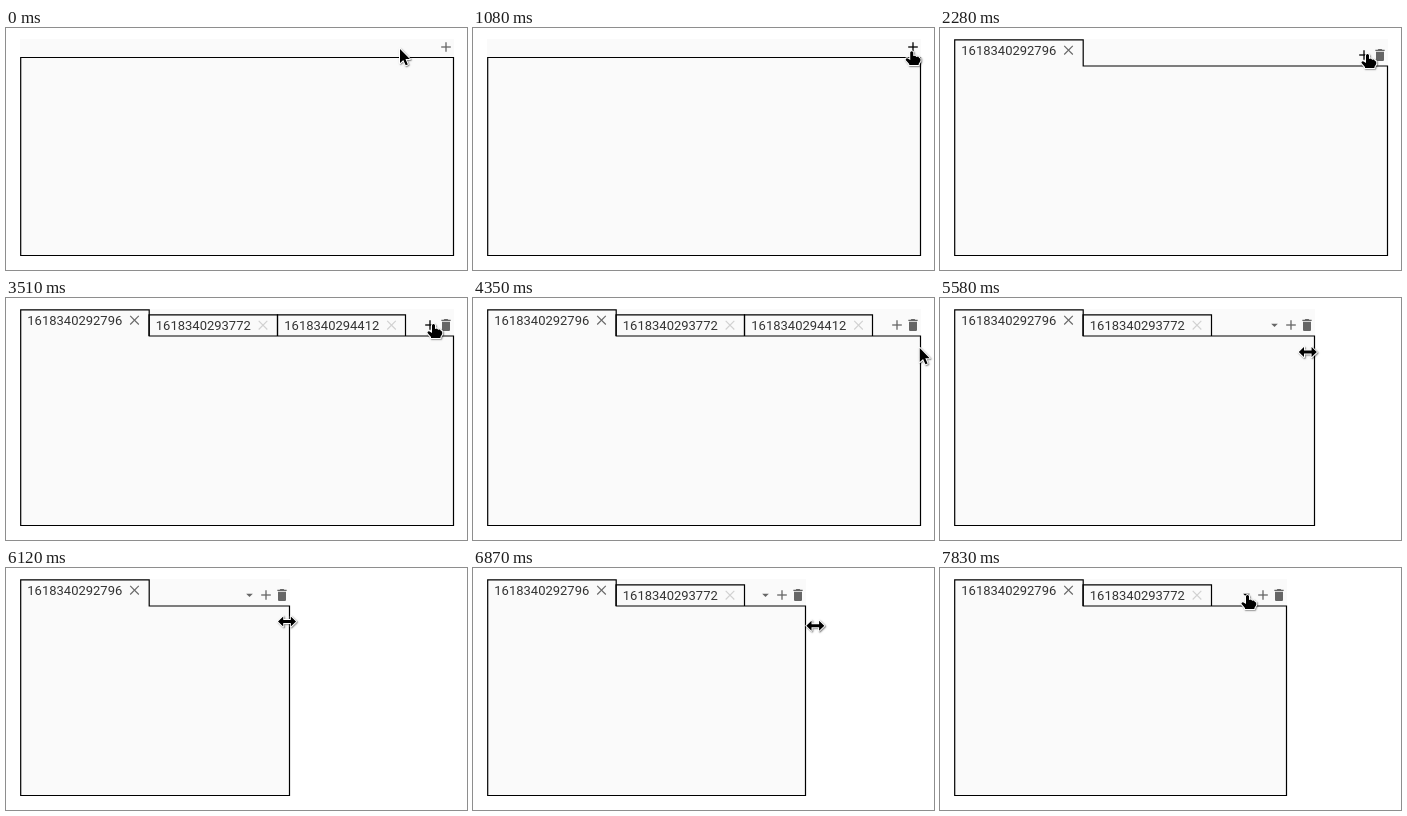
Recreate the animation shown at these times as an HTML page with a canvas. Size 461 px wide and 242 px high, loop 8 s.

```html
<!DOCTYPE html>
<html lang="en">
<head>
<meta charset="utf-8">
<title>Tabs</title>
<style>
html, body { margin: 0; width: 100%; height: 100%; overflow: hidden; background: #fff; }
canvas { display: block; }
</style>
</head>
<body>
<canvas id="stage" width="461" height="242"></canvas>
<script>
const ctx = document.getElementById('stage').getContext('2d');
const LOOP = 8000, STEP = 30, LAG = 50;
const LEFT = 14.5, BOTTOM = 227.5, FULL = 447.5, TAB_W = 128.5;
const DRAG_START = 4910, DRAG_END = 6985;

const tabs = [
  { label: '1618340292796', at: 1590 },
  { label: '1618340293772', at: 2760 },
  { label: '1618340294412', at: 3510 }
];

// Each eased move ends at (x, y); bend bows the path downwards.
const start = { x: 393.5, y: 20 };
const moves = [
  { from: 345, to: 1140, x: 440, y: 21, bend: 9 },
  { from: 1215, to: 1260, x: 444, y: 23, bend: 0 },
  { from: 1845, to: 2280, x: 428, y: 26, bend: 2 },
  { from: 4095, to: 4455, x: 451, y: 57, bend: -2 },
  { from: DRAG_START, to: 6320, x: 271.2, y: 54, bend: -1.5 },
  { from: 6370, to: DRAG_END, x: 349.5, y: 58, bend: 0 },
  { from: 7245, to: 7830, x: 308, y: 27, bend: 0 }
];

const cursors = {
  arrow: new Path2D('M.5 1V15L3.8 11.9L6.2 17.3L8.3 16.4L6 11.1H10.4Z'),
  hand: new Path2D('M-2 1.2Q-.5-1 1 1.2V5L3 4.6L4.2 5.8L6 5.5L7 7L8.2 7.4V10L6.4 13V14H-3V13' +
    'L-6.6 8.8Q-6.4 6.6-4.4 7.4L-2 9Z'),
  resize: new Path2D('M-9 0L-3.8-5V-1.5H3.8V-5L9 0L3.8 5V1.5H-3.8V5Z')
};
const trash = new Path2D('M6 19c0 1.1.9 2 2 2h8c1.1 0 2-.9 2-2V7H6v12z' +
  'M19 4h-3.5l-1-1h-5l-1 1H5v2h14V4z');

function pointer(t) {
  let { x, y } = start;
  for (const m of moves) {
    const f = Math.min(1, Math.max(0, (t - m.from) / (m.to - m.from)));
    const eased = f * f * (3 - 2 * f);
    x += (m.x - x) * eased;
    y += (m.y - y) * eased + m.bend * Math.sin(Math.PI * f);
  }
  return { x, y };
}

function rightEdge(t) {
  if (t < DRAG_START + LAG) return FULL;
  return Math.floor(pointer(Math.min(t - LAG, DRAG_END)).x - 3) + 0.5;
}

function line(color, width, ...points) {
  ctx.strokeStyle = color;
  ctx.lineWidth = width;
  ctx.beginPath();
  points.forEach(([x, y], i) => i ? ctx.lineTo(x, y) : ctx.moveTo(x, y));
  ctx.stroke();
}

function plus(x, y, color) {
  line(color, 1.3, [x - 4.8, y], [x + 4.8, y]);
  line(color, 1.3, [x, y - 4.8], [x, y + 4.8]);
}

function cross(x, y, color) {
  line(color, 1.1, [x - 4.3, y - 4.3], [x + 4.3, y + 4.3]);
  line(color, 1.1, [x - 4.3, y + 4.3], [x + 4.3, y - 4.3]);
}

function drawTab(tab, i) {
  const x = LEFT + i * TAB_W;
  const drop = i ? 5 : 0;
  if (i) {
    const end = Math.floor(x + TAB_W - 0.5) + 0.5;
    line('#000', 1.2, [x, 38], [x, 16.9], [end, 16.9], [end, 38]);
  }
  ctx.fillStyle = '#333';
  ctx.font = '13px Roboto, sans-serif';
  ctx.fillText(tab.label, x + 6.8, 27 + drop);
  cross(x + 114, 22.2 + drop, i ? '#d0d0d0' : '#666');
}

function drawTrash(x, color) {
  ctx.save();
  ctx.translate(x - 8, 19);
  ctx.scale(2 / 3, 2 / 3);
  ctx.fillStyle = color;
  ctx.fill(trash);
  ctx.restore();
}

function drawCaret(x, color) {
  ctx.fillStyle = color;
  ctx.beginPath();
  ctx.moveTo(x - 3.3, 25.7);
  ctx.lineTo(x + 3.3, 25.7);
  ctx.lineTo(x, 29);
  ctx.fill();
}

// Draws the buttons and tells whether the pointer is over one.
function drawTools(edge, open, overflow, pos) {
  const y = open ? 27 : 19;
  let hovered = false;
  const tint = x => {
    const over = Math.abs(pos.x - x) < 8 && Math.abs(pos.y - y) < 8;
    hovered = hovered || over;
    return over ? '#000' : '#666';
  };
  const plusX = edge - (open ? 23.5 : 7.5);
  plus(plusX, y, tint(plusX));
  if (open) drawTrash(edge - 7.5, tint(edge - 7.5));
  if (overflow) drawCaret(edge - 40, tint(edge - 40));
  return hovered;
}

function drawCursor(shape, { x, y }) {
  ctx.save();
  ctx.translate(x, y);
  ctx.lineJoin = 'round';
  ctx.strokeStyle = '#fff';
  ctx.lineWidth = 2;
  ctx.shadowColor = 'rgba(0, 0, 0, 0.5)';
  ctx.shadowBlur = 1.5;
  ctx.shadowOffsetX = ctx.shadowOffsetY = 0.8;
  ctx.stroke(cursors[shape]);
  ctx.shadowColor = 'transparent';
  ctx.fillStyle = '#000';
  ctx.fill(cursors[shape]);
  ctx.restore();
}

function draw(t) {
  const edge = rightEdge(t);
  const pos = pointer(t);
  const open = tabs.filter(tab => tab.at <= t);
  const fits = (n, room) => LEFT + n * TAB_W <= edge - room;
  const overflow = !fits(open.length, 32);
  const shown = open.filter((tab, i) => i === 0 || fits(i + 1, overflow ? 48 : 32));

  ctx.fillStyle = '#fff';
  ctx.fillRect(0, 0, 461, 242);
  ctx.fillStyle = '#fafafa';
  ctx.fillRect(14, 11, edge - 13.5, 217);

  const top = open.length ? 38 : 29.5;
  const outline = open.length
    ? [[LEFT, 11.8], [143.2, 11.8], [143.2, top], [edge, top]]
    : [[LEFT, top], [edge, top]];
  line('#000', 1.2, ...outline, [edge, BOTTOM], [LEFT + 0.2, BOTTOM], [LEFT + 0.2, outline[0][1] - 0.5]);

  shown.forEach(drawTab);
  const hovered = drawTools(edge, open.length > 0, overflow, pos);
  const onEdge = pos.y > 51 && Math.abs(pos.x - edge) < 14;
  drawCursor(hovered ? 'hand' : onEdge ? 'resize' : 'arrow', pos);
}

function frame(now) {
  draw(Math.floor((now % LOOP) / STEP) * STEP);
  requestAnimationFrame(frame);
}
requestAnimationFrame(frame);
</script>
</body>
</html>
```
